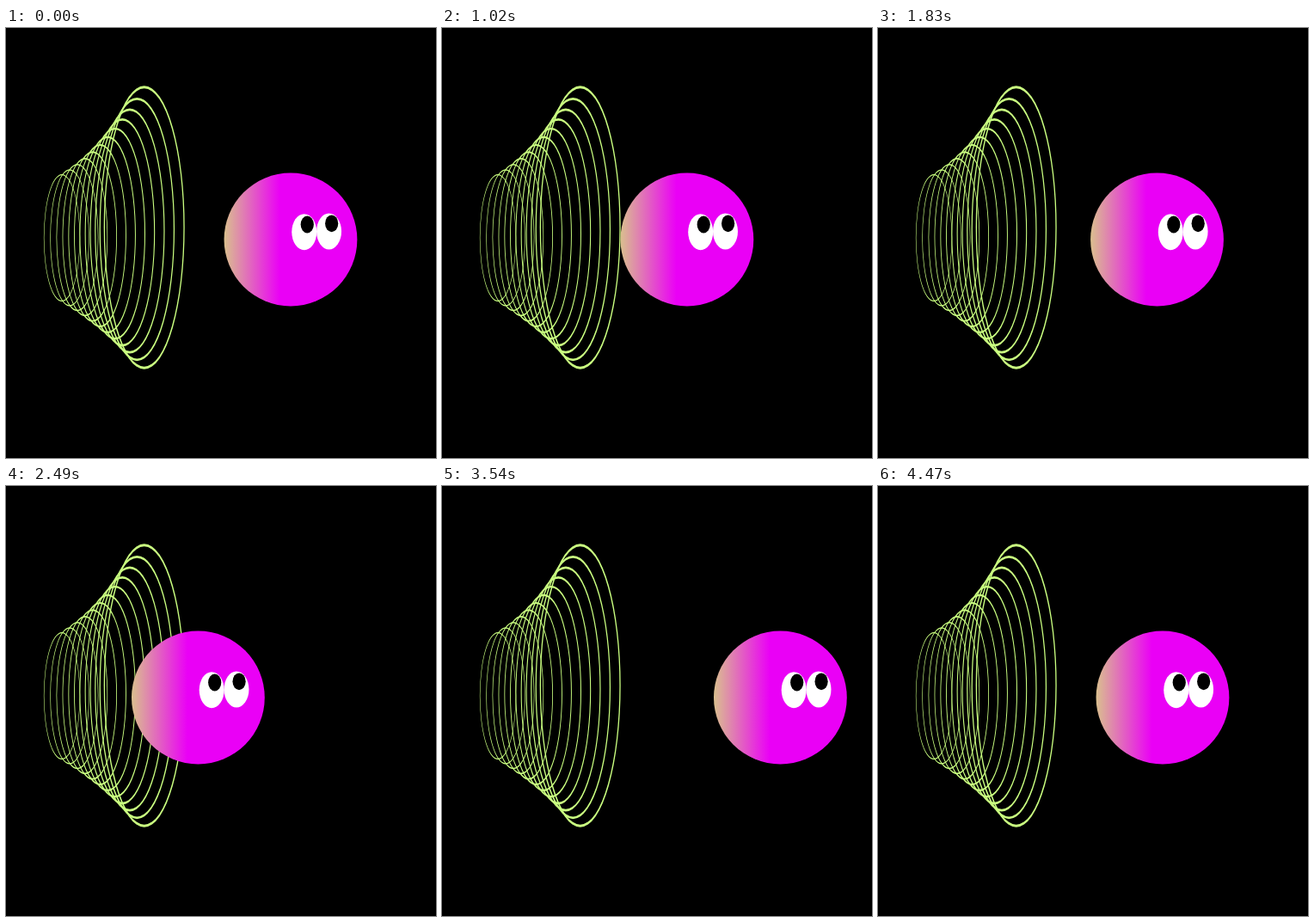
Write an HTML page with a canvas that moves like this. It is 500 px wide and 500 px high and loops after 4.5 s.

```html
<!DOCTYPE html>
<html lang="en">
<head>
<meta charset="utf-8">
<title>Ball and rings</title>
<style>
  html, body { margin: 0; width: 100%; height: 100%; overflow: hidden; background: #000; }
  canvas { display: block; width: 100vw; height: 100vh; }
</style>
</head>
<body>
<canvas id="stage" width="500" height="500"></canvas>
<script>
const ctx = document.getElementById('stage').getContext('2d');
const LOOP = 4500, STEP = 30, RING_COUNT = 12, RADIUS = 77.4;

// Each move: start and end time, start and end x of the ball's left edge, easing handles.
const moves = [
  { from: -890, to: 1010, a: 316.5, b: 207.4, x1: 0.215, x2: 0.56 },
  { from: 1010, to: 1499, a: 207.4, b: 293.3, x1: 0.333, x2: 0.667 },
  { from: 1499, to: 2390, a: 293.3, b: 145, x1: 0.333, x2: 0.667 },
  { from: 2440, to: 3580, a: 145, b: 316.5, x1: 0.33, x2: 0.63 },
  { from: 3580, to: 5480, a: 316.5, b: 207.4, x1: 0.215, x2: 0.56 }
];

// Cubic Bezier easing with handles (x1, 0) and (x2, 1), solved by bisection.
function ease(u, x1, x2) {
  let lo = 0, hi = 1, s = u;
  for (let i = 0; i < 24; i++) {
    s = (lo + hi) / 2;
    const x = 3 * x1 * s * (1 - s) ** 2 + 3 * x2 * s * s * (1 - s) + s ** 3;
    if (x < u) lo = s; else hi = s;
  }
  return s * s * (3 - 2 * s);
}

function ballLeft(t) {
  const { from, to, a, b, x1, x2 } = moves.find(m => t < m.to);
  const u = Math.max(0, (t - from) / (to - from));
  return a + (b - a) * ease(u, x1, x2);
}

function oval(x, y, rx, ry, fill) {
  ctx.fillStyle = fill;
  ctx.beginPath();
  ctx.ellipse(x, y, rx, ry, 0, 0, 2 * Math.PI);
  ctx.fill();
}

// A ring whose line is heavier at top and bottom than at the sides.
function ring(x, y, rx, ry, side, cap) {
  ctx.beginPath();
  for (const k of [0.5, -0.5]) {
    ctx.ellipse(x, y, rx + k * side, ry + k * cap, 0, 0, 2 * Math.PI);
    ctx.closePath();
  }
  ctx.fill('evenodd');
}

function drawRings() {
  ctx.fillStyle = '#caff80';
  for (let i = RING_COUNT - 1; i >= 0; i--) {
    const p = i / (RING_COUNT - 1);
    const cx = 160.7 - 91.7 * p - 4 * p * p;
    const cy = 244 - 12 * (1 - p) ** 2;
    const ry = 163.2 * 0.45 ** p;
    ring(cx, cy, ry * 0.284, ry, 1.3 - 0.75 * p, 3 - 1.7 * p);
  }
}

function drawBall(left) {
  const skin = ctx.createLinearGradient(0, 0, 2 * RADIUS, 0);
  skin.addColorStop(0, '#dac08e');
  skin.addColorStop(0.42, '#ea00f6');
  ctx.save();
  ctx.translate(left, 0);
  oval(RADIUS, 246, RADIUS, RADIUS, skin);
  oval(93.2, 237.2, 14.5, 21, '#fff');
  oval(122, 236.5, 14.5, 21, '#fff');
  oval(96.7, 228.5, 7.6, 9.9, '#000');
  oval(125.1, 227.3, 7.6, 9.9, '#000');
  ctx.restore();
}

function draw(now) {
  const t = Math.floor((now % LOOP) / STEP) * STEP;
  ctx.fillStyle = '#000';
  ctx.fillRect(0, 0, 500, 500);
  drawRings();
  drawBall(ballLeft(Math.min(t, LOOP - STEP)));
}

let start;
function tick(now) {
  start ??= now;
  draw(now - start);
  requestAnimationFrame(tick);
}
draw(0);
requestAnimationFrame(tick);
</script>
</body>
</html>
```
